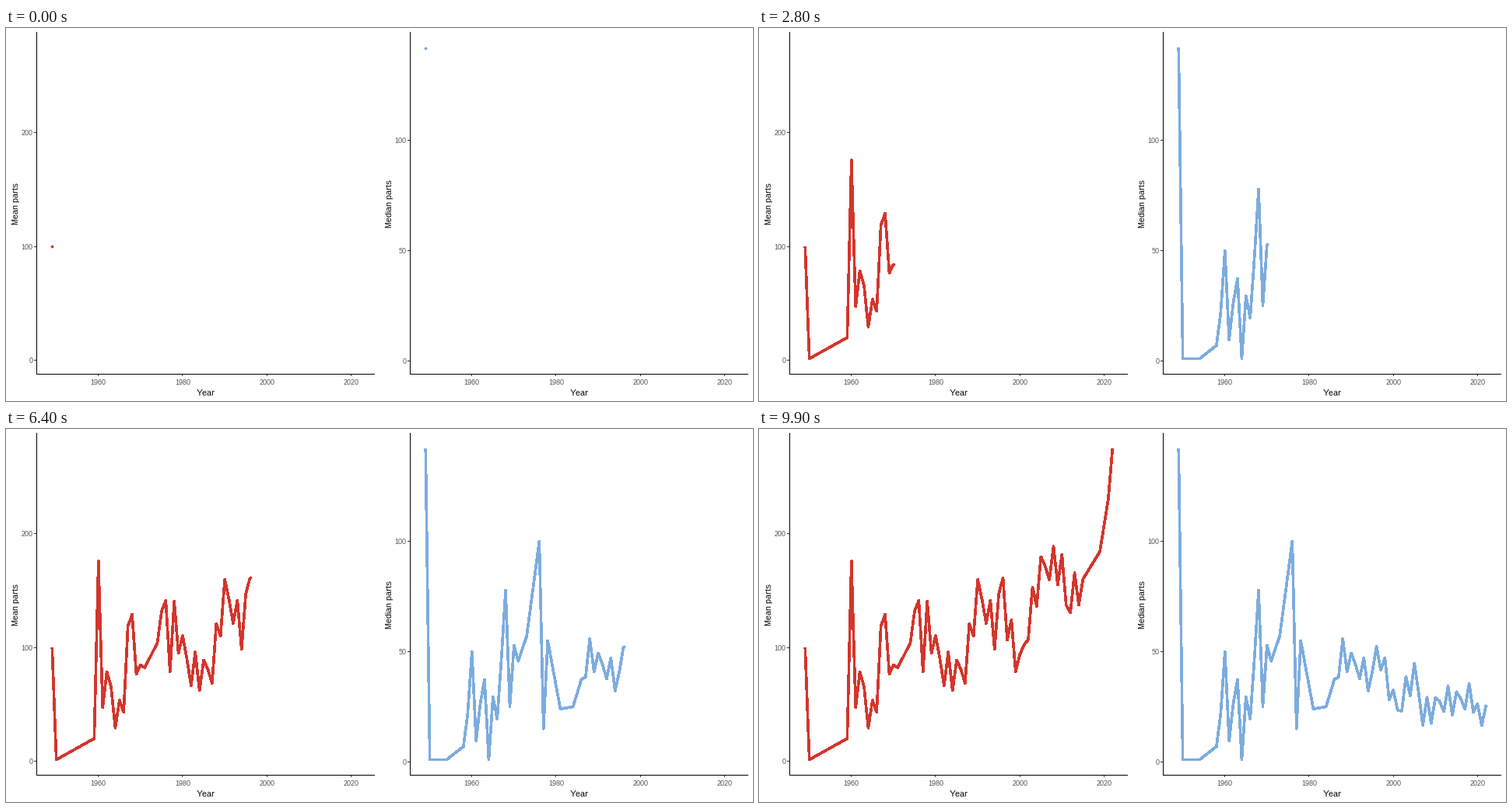
A matplotlib script for the animation above (10 s loop, 960 by 480 pixels).

```python
import math

import numpy as np
import matplotlib.pyplot as plt
from matplotlib.animation import FuncAnimation
from matplotlib.patches import Rectangle

W, H, DPI = 960, 480, 100
FRAMES, STEP = 100, 100
FIRST, LAST = 1949, 2022
PX = 72 / DPI  # points per pixel

YEARS = np.arange(FIRST, LAST + 1)
# Each year is reached on a whole frame; the head glides linearly in between.
REACH = np.round((FRAMES - 1) * (YEARS - FIRST) / (LAST - FIRST))
# Both series swing up and down about twice in five years.
BEAT = np.cos(2 * np.pi * (YEARS - 1980.4) / 2.5)

MEAN_TREND = [
    (1949, 100), (1950, 1.5), (1959, 20), (1960, 166), (1961, 46),
    (1962, 90), (1963, 48), (1966, 42), (1967, 130), (1970, 75),
    (1974, 104), (1976, 140), (1977, 90), (1978, 123), (1982, 78),
    (1987, 80), (1990, 150), (1994, 115), (1996, 160), (1997, 118),
    (2000, 84), (2005, 170), (2010, 172), (2011, 136), (2019, 184),
    (2021, 230), (2022, 274.3)]
MEDIAN_TREND = [
    (1949, 142), (1950, 1), (1954, 1), (1958, 7), (1960, 37), (1961, 8),
    (1962, 42), (1963, 14), (1966, 18), (1967, 62), (1970, 40), (1973, 57),
    (1976, 100), (1977, 15), (1978, 55), (1981, 24), (1984, 25), (1988, 49),
    (1995, 37), (1996, 52), (2001, 23), (2005, 41), (2007, 21), (2011, 27),
    (2019, 29), (2021, 16), (2022, 30)]


def series(trend, swings):
    """Straight trend lines plus the beat, given as (start, end, amplitude)."""
    values = np.interp(YEARS, *zip(*trend))
    for start, end, amp in swings:
        values += amp * BEAT * ((YEARS >= start) & (YEARS <= end))
    return np.maximum(values, 1)


plt.rcParams.update({"font.family": "Liberation Sans",
                     "text.hinting": "native", "text.hinting_factor": 1})
fig = plt.figure(figsize=(W / DPI, H / DPI), dpi=DPI, facecolor="white")
ax = fig.add_axes([0, 0, 1, 1])
ax.set_xlim(0, W)
ax.set_ylim(H, 0)
ax.axis("off")


def bar(x, y, w, h, color):
    ax.add_patch(Rectangle((math.floor(x), math.floor(y)), w, h, color=color,
                           lw=0, antialiased=False))


def label(x, y, text, size, color, ha="center", rotation=0):
    ax.text(x, y, text, fontsize=size * PX, color=color, ha=ha,
            va="baseline", rotation=rotation, rotation_mode="anchor")


class Panel:
    TOP, BOTTOM, LEFT, RIGHT = 5, 445, 39, 474

    def __init__(self, left, title, values, ticks, color):
        self.left = left
        self.low = values.min()
        self.scale = 400 / np.ptp(values)
        self.draw_axes(title, ticks)
        self.line, = ax.plot([], [], color=color, lw=2.6 * PX,
                             antialiased=False, solid_capstyle="butt",
                             solid_joinstyle="round")
        self.head, = ax.plot([], [], "o", color=color, ms=3.8 * PX, mew=0)
        self.xs, self.ys = self.x(YEARS), self.y(values)

    def x(self, year):
        return self.left + 59.25 + (year - FIRST) * 395 / (LAST - FIRST)

    def y(self, value):
        return 425.5 - (value - self.low) * self.scale

    def draw_axes(self, title, ticks):
        x0, x1 = self.left + self.LEFT, self.left + self.RIGHT
        for year in range(1960, 2021, 20):
            x = self.x(year)
            bar(x, self.BOTTOM, 1, 3, "#333333")
            label(x, 459, str(year), 9, "#4D4D4D")
        for value in ticks:
            y = self.y(value)
            bar(x0 - 3, y, 3, 1, "#333333")
            label(x0 - 4.5, y + 3.8, str(value), 9, "#4D4D4D", ha="right")
        bar(x0, self.TOP, 1, self.BOTTOM - self.TOP + 1, "black")
        bar(x0, self.BOTTOM, x1 - x0, 1, "black")
        label((x0 + x1) / 2, 473, "Year", 11, "black")
        label(self.left + 15.5, 226, title, 11, "black", rotation=90)

    def show(self, frame):
        past = REACH < frame
        x = np.interp(frame, REACH, self.xs)
        y = np.interp(frame, REACH, self.ys)
        self.line.set_data(np.append(self.xs[past], x),
                           np.append(self.ys[past], y))
        self.head.set_data([x], [y])
        return self.line, self.head


mean = series(MEAN_TREND, [(1960, 1970, 18), (1975, 2014, 18)])
median = series(MEDIAN_TREND, [(1960, 1970, 24), (1986, 2022, 7)])
panels = [
    Panel(0, "Mean parts", mean, (0, 100, 200), "#D4352C"),
    Panel(480, "Median parts", median, (0, 50, 100), "#7CACDE"),
]


def update(frame):
    return [artist for panel in panels for artist in panel.show(frame)]


anim = FuncAnimation(fig, update, frames=FRAMES, interval=STEP,
                     init_func=lambda: update(0), repeat=True,
                     repeat_delay=0, blit=False)
plt.show()
```
